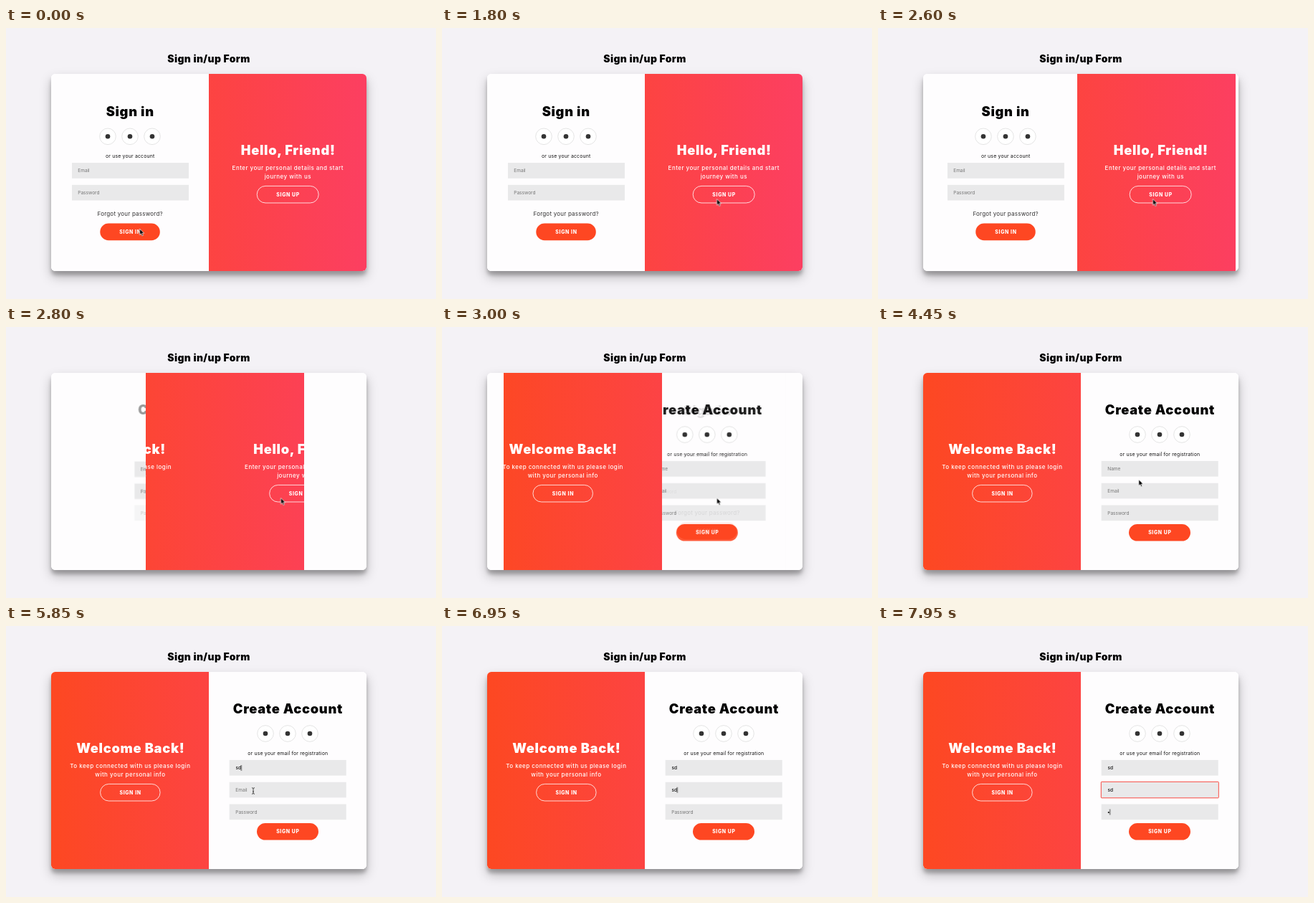
Recreate the animation shown at these times as an HTML page. Size 600 by 378 pixels, loop 8000 ms.

```html
<!DOCTYPE html>
<html lang="en">
<head>
<meta charset="utf-8">
<title>Sign in/up Form</title>
<style>
  html, body { margin: 0; width: 100%; height: 100%; overflow: hidden; background: #f4f2f6; }
  svg { position: absolute; left: 0; top: 0; display: block; }
  text { font-family: Inter, sans-serif; font-optical-sizing: none; text-anchor: middle; }

  .card {
    position: absolute; left: 63px; top: 64px; width: 440px; height: 275px;
    border-radius: 5.7px; overflow: hidden; background: #fefdfe;
  }
  .shadow { overflow: visible; box-shadow: 0 8px 16px rgba(0,0,0,.25), 0 5.7px 5.7px rgba(0,0,0,.22); }
  .page { fill: #fefdfe; }

  .heading { font-size: 13.9px; font-weight: 900; letter-spacing: .4px; }
  .title { font-size: 18.3px; font-weight: 900; letter-spacing: .7px; }
  .copy { font-size: 8px; font-weight: 500; letter-spacing: .46px; }
  .hint { font-size: 6.9px; letter-spacing: .18px; fill: #111; }
  .link { font-size: 8px; letter-spacing: .22px; fill: #333; }
  .label { font-size: 6.9px; font-weight: 800; letter-spacing: .65px; fill: #fff; }
  .input { fill: #e9e9ea; }
  .field { font-size: 6.5px; text-anchor: start; fill: #757575; }
  .typed { fill: #111; font-weight: 500; }
  .solid { fill: #fe4722; }
  .ghost { fill: none; stroke: #fff; stroke-width: .8; }
  .overlay { fill: #fff; }

  .overlay, .welcome, .hello, .form, .layer, .caret, .pointer, .arrow, .beam, .step {
    animation: 8s ease-in-out infinite;
  }
  .layer, .caret, .arrow, .beam, .step { animation-timing-function: step-end; }

  /* The panel swap runs for 600 ms from 2537 ms. */
  .overlay { animation-name: reveal; }
  .welcome { animation-name: welcome; }
  .hello { animation-name: hello; }
  .signin { animation-name: signin; }
  .signup { animation-name: signup; }
  .layer { animation-name: raise; }
  @keyframes reveal {
    0%, 31.7125% { clip-path: inset(0 0 0 220px); }
    39.2125%, 100% { clip-path: inset(0 220px 0 0); }
  }
  @keyframes welcome {
    0%, 31.7125% { transform: translateX(-44px); }
    39.2125%, 100% { transform: none; }
  }
  @keyframes hello {
    0%, 31.7125% { transform: none; }
    39.2125%, 100% { transform: translateX(44px); }
  }
  @keyframes signin {
    0%, 31.7125% { transform: none; }
    39.2125%, 100% { transform: translateX(220px); }
  }
  @keyframes signup {
    0%, 31.7125% { transform: translateX(-220px); opacity: 0; }
    39.2125%, 100% { transform: none; opacity: 1; }
  }
  @keyframes raise { 0% { visibility: hidden; } 34.91%, 100% { visibility: visible; } }

  .name-hint { animation-name: name-hint; }
  .name-1 { animation-name: name-1; }
  .name-2 { animation-name: name-2; }
  .mail-hint { animation-name: mail-hint; }
  .mail-1 { animation-name: mail-1; }
  .mail-2 { animation-name: mail-2; }
  .invalid { animation-name: invalid; }
  .pass-hint { animation-name: pass-hint; }
  .pass-1 { animation-name: pass-1; }
  @keyframes name-hint { 0% { opacity: 1; } 65%, 100% { opacity: 0; } }
  @keyframes name-1 { 0% { opacity: 0; } 65%, 100% { opacity: 1; } }
  @keyframes name-2 { 0% { opacity: 0; } 67.5%, 100% { opacity: 1; } }
  @keyframes mail-hint { 0% { opacity: 1; } 81.25%, 100% { opacity: 0; } }
  @keyframes mail-1 { 0% { opacity: 0; } 81.25%, 100% { opacity: 1; } }
  @keyframes mail-2 { 0% { opacity: 0; } 84.4%, 100% { opacity: 1; } }
  @keyframes invalid { 0% { opacity: 0; } 96.25%, 100% { opacity: 1; } }
  @keyframes pass-hint { 0% { opacity: 1; } 98.75%, 100% { opacity: 0; } }
  @keyframes pass-1 { 0% { opacity: 0; } 98.75%, 100% { opacity: 1; } }

  .caret { animation-name: caret; }
  @keyframes caret {
    0% { opacity: 0; transform: translate(320.5px, 198px); }
    61.25% { opacity: 1; transform: translate(320.5px, 198px); }
    65% { opacity: 1; transform: translate(324.3px, 198px); }
    67.5% { opacity: 1; transform: translate(328.3px, 198px); }
    75% { opacity: 1; transform: translate(320.5px, 228.7px); }
    81.25% { opacity: 1; transform: translate(324.3px, 228.7px); }
    84.4% { opacity: 1; transform: translate(328.3px, 228.7px); }
    96.25% { opacity: 1; transform: translate(320.5px, 259.5px); }
    98.75%, 100% { opacity: 1; transform: translate(323.6px, 259.5px); }
  }

  .pointer { animation-name: pointer; }
  .arrow { animation-name: arrow; }
  .beam { animation-name: beam; }
  @keyframes pointer {
    0%, 5% { transform: translate(186.5px, 280px); }
    15%, 48.75% { transform: translate(383.5px, 238.5px); }
    55.625% { transform: translate(363.8px, 212.8px); }
    59.4%, 70% { transform: translate(343px, 199px); }
    73%, 100% { transform: translate(345px, 230px); }
  }
  @keyframes arrow { 0% { opacity: 1; } 57%, 100% { opacity: 0; } }
  @keyframes beam {
    0% { opacity: 0; }
    57% { opacity: 1; }
    65% { opacity: 0; }
    70% { opacity: 1; }
    81.25%, 100% { opacity: 0; }
  }
</style>
</head>
<body>
<div class="card shadow"></div>

<div class="card">
  <svg width="440" height="275" viewBox="63 64 440 275">
    <defs>
      <g id="social">
        <g fill="#fff" stroke="#ddd" stroke-width=".8">
          <circle cx="-31" r="11.3"/><circle r="11.3"/><circle cx="31" r="11.3"/>
        </g>
        <g fill="#333">
          <circle cx="-31" r="3.3"/><circle r="3.3"/><circle cx="31" r="3.3"/>
        </g>
      </g>
      <rect id="input" width="163" height="21.7"/>
      <rect id="small" width="83.5" height="23.6" rx="11.8"/>
      <rect id="large" width="86" height="23.6" rx="11.8"/>
    </defs>

    <g class="form signin">
      <rect class="page" x="63" y="64" width="220" height="275"/>
      <text class="title" x="173.2" y="123.3">Sign in</text>
      <use href="#social" x="173" y="151.3"/>
      <text class="hint" x="173.2" y="181">or use your account</text>
      <use class="input" href="#input" x="92" y="188"/>
      <text class="field" x="100.3" y="201.2">Email</text>
      <use class="input" href="#input" x="92" y="218.8"/>
      <text class="field" x="100.3" y="232">Password</text>
      <text class="link" x="173.2" y="261.8">Forgot your password?</text>
      <use class="solid" href="#small" x="131.3" y="272.6"/>
      <text class="label" x="173.5" y="286.9">SIGN IN</text>
    </g>

    <g class="layer">
      <g class="form signup">
        <rect class="page" x="283" y="64" width="220" height="275"/>
        <text class="title" x="393.4" y="122">Create Account</text>
        <use href="#social" x="393" y="150"/>
        <text class="hint" x="393.2" y="179.8">or use your email for registration</text>
        <use class="input" href="#input" x="311.7" y="186.9"/>
        <use class="input" href="#input" x="311.7" y="217.7"/>
        <use class="input" href="#input" x="311.7" y="248.5"/>
        <rect class="step invalid" x="311.3" y="217.3" width="164" height="22.5" rx=".8" fill="none" stroke="#f4483f"/>

        <text class="field step name-hint" x="320.3" y="200.2">Name</text>
        <text class="field typed step name-1" x="320.5" y="200.2">s</text>
        <text class="field typed step name-2" x="324.1" y="200.2">d</text>
        <text class="field step mail-hint" x="320.3" y="231">Email</text>
        <text class="field typed step mail-1" x="320.5" y="231">s</text>
        <text class="field typed step mail-2" x="324.1" y="231">d</text>
        <text class="field step pass-hint" x="320.3" y="261.8">Password</text>
        <circle class="step pass-1" cx="321.8" cy="260" r="1.1" fill="#111"/>
        <path class="caret" d="M0-4V4" stroke="#111" stroke-width=".8"/>

        <use class="solid" href="#large" x="350" y="275"/>
        <text class="label" x="393.4" y="289.3">SIGN UP</text>
      </g>
    </g>
  </svg>

  <svg class="overlay" width="440" height="275" viewBox="63 64 440 275">
    <linearGradient id="warm" gradientUnits="userSpaceOnUse" x1="63" y1="0" x2="503" y2="0">
      <stop stop-color="#fd4822"/>
      <stop offset="1" stop-color="#fc3f61"/>
    </linearGradient>
    <rect x="63" y="64" width="440" height="275" fill="url(#warm)"/>
    <g class="welcome">
      <text class="title" x="173.8" y="176.6">Welcome Back!</text>
      <text class="copy" x="173.4" y="198.2">To keep connected with us please login</text>
      <text class="copy" x="173.4" y="209.7">with your personal info</text>
      <use class="ghost" href="#small" x="131.6" y="220.4"/>
      <text class="label" x="173.6" y="234.7">SIGN IN</text>
    </g>
    <g class="hello">
      <text class="title" x="393.7" y="176.6">Hello, Friend!</text>
      <text class="copy" x="393.3" y="198.2">Enter your personal details and start</text>
      <text class="copy" x="393.3" y="209.7">journey with us</text>
      <use class="ghost" href="#large" x="350.2" y="220.4"/>
      <text class="label" x="393.6" y="234.7">SIGN UP</text>
    </g>
  </svg>
</div>

<svg width="600" height="378" viewBox="0 0 600 378">
  <text class="heading" x="283" y="48.2">Sign in/up Form</text>
  <g class="pointer">
    <path class="arrow" d="M0 0V8.6L2 6.8L3.4 9.9L4.9 9.2L3.5 6.2H6.2Z" fill="#000" stroke="#fff" stroke-width=".7"/>
    <path class="beam" d="M-2-4.3Q0-4.3 0-3.2Q0-4.3 2-4.3M0-3.2V3.2M-2 4.3Q0 4.3 0 3.2Q0 4.3 2 4.3M-1 1H1" fill="none" stroke="#222" stroke-width=".8"/>
  </g>
</svg>
</body>
</html>
```
